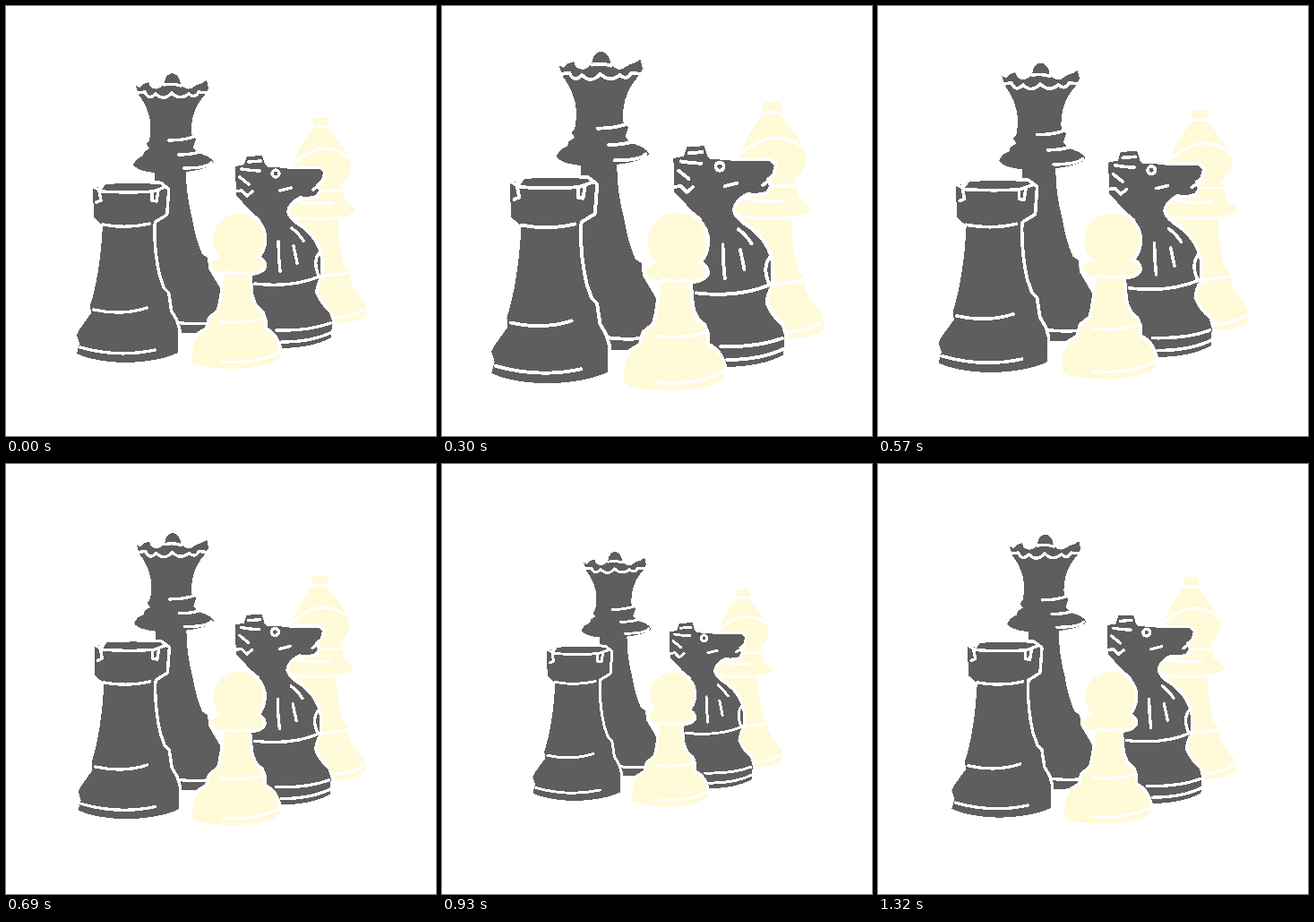
Recreate the animation shown at these times as an HTML page. Size 480 by 480 pixels, loop 1350 ms.

```html
<!DOCTYPE html>
<html lang="en">
<head>
<meta charset="utf-8">
<title>Chess pieces</title>
<style>
  html, body { margin: 0; height: 100%; overflow: hidden; background: #fff; }
  svg { display: block; width: 100vw; height: 100vh; shape-rendering: crispEdges; }
  path { stroke: #fff; stroke-linejoin: round; stroke-linecap: round; }
  .dark, .light { stroke-width: 7; paint-order: stroke; }
  .dark { fill: #5e5e5e; }
  .light { fill: #fffad7; }
  .line { fill: none; stroke-width: 3.4; }
</style>
</head>
<body>
<svg viewBox="0 0 480 480">
  <g id="pieces">
    <g id="queen">
      <path class="dark" d="M148 99L145 89 149 91 153 87 159 85 161 90Q168 96 176 88L177 85Q178 76 186 75Q194 77 195 88Q203 96 210 90L213 88 219 86 224 83 226 92 222 99Q213 109 209 122Q206 134 207 144L212 149 209 158 214 164Q231 169 232 175Q226 182 201 185Q201 212 208 238Q212 262 219 277L225 281 226 293 239 315 240 335 224 364Q210 366 180 365L150 300 166 250V186Q146 184 142 177L146 171 153 167 154 163 160 159 157 154 160 150Q164 132 158 117Q155 108 148 99Z"/>
      <path class="line" d="M147 97L155 96Q159 106 167 98Q176 107 185 97Q194 106 204 98Q211 104 215 96L224 97M177 88Q186 86 195 89"/>
      <path class="line" d="M182 150Q200 150 212 145M193 166Q206 166 216 163M199 181Q224 181 229 175M189 353Q206 356 227 354"/>
    </g>
    <g id="bishop">
      <path class="light" d="M343 125Q352 122 360 125L361 132 359 136Q367 145 378 161Q385 170 385 180Q383 192 373 200L377 205 377 216 390 227Q388 234 370 236Q371 268 378 290L384 296 384 306Q390 320 401 331L403 345Q392 354 368 354L340 320 324 236Q314 231 315 224L350 208 320 180Q324 161 343 136Z"/>
      <path class="line" d="M342 134Q351 136 361 134M323 174Q337 161 354 159Q371 159 382 169M352 206L375 206M328 219Q344 222 364 220M324 236Q350 239 372 236M353 301Q371 301 384 297M367 348Q386 347 399 339"/>
    </g>
    <g id="knight">
      <path class="dark" d="M256 179L266 177 269 168 286 167 289 177 292 180Q306 180 318 182L350 182 354 186 352 194 346 199 349 206 346 211Q338 214 328 212Q314 219 313 230Q315 239 330 248Q348 262 351 282L351 302Q346 309 345 320Q350 333 361 342L364 352 363 370Q342 382 304 382L278 345 268 320 276 290 284 238 273 229 264 219 257 212Z"/>
      <path class="line" d="M271 174L284 173M263 182Q274 184 283 184M261 191L271 199M256 207L263 206 269 212 275 207M306 206L318 203M343 205L351 199M304 263Q304 280 306 296M319 248Q327 254 332 262M321 268L325 287M350 275Q342 285 349 301M278 310Q321 315 352 301M302 362Q338 363 362 354M308 375Q342 375 364 364"/>
      <path class="line" d="M297 187a4 4 0 1 0 8 0a4 4 0 1 0 -8 0"/>
    </g>
    <g id="rook">
      <path class="dark" d="M97 203L102 202 107 205 111 199Q140 197 172 199L180 205 178 232 165 240 164 247Q164 277 170 302L175 316 180 321 183 341 189 351 192 361 192 387Q171 397 133 398Q98 397 79 388L82 377 79 367 82 361 95 343 94 334Q105 300 108 245L98 236Z"/>
      <path class="line" d="M98 202L107 207Q138 209 164 207L178 202M104 207L106 217 101 219M163 208L163 217 168 218 170 206M108 244Q135 249 160 243M98 339Q130 346 157 337M83 381Q125 393 166 384"/>
    </g>
    <g id="pawn">
      <path class="light" d="M240 281A28.5 28.5 0 1 1 279 281Q287 283 288 290Q286 297 271 298L273 322Q276 337 285 342L288 350 288 361Q304 367 306 391Q301 402 260 405Q220 405 208 398Q206 379 215 367L225 361 228 349 238 341Q243 324 244 298Q230 297 229 289Q231 283 240 281Z"/>
      <path class="line" d="M244 297Q259 300 272 297M240 352Q264 355 286 349M241 397Q278 400 304 387"/>
    </g>
  </g>
</svg>
<script>
  const PERIOD = 1350, STEP = 30, SWELL = 0.15;
  const pieces = document.getElementById('pieces');

  function draw() {
    const time = Math.floor(performance.now() / STEP) * STEP;
    const scale = 1 + SWELL * Math.sin(2 * Math.PI * time / PERIOD);
    pieces.setAttribute('transform', `translate(240 240) scale(${scale}) translate(-240 -240)`);
    requestAnimationFrame(draw);
  }
  draw();
</script>
</body>
</html>
```
